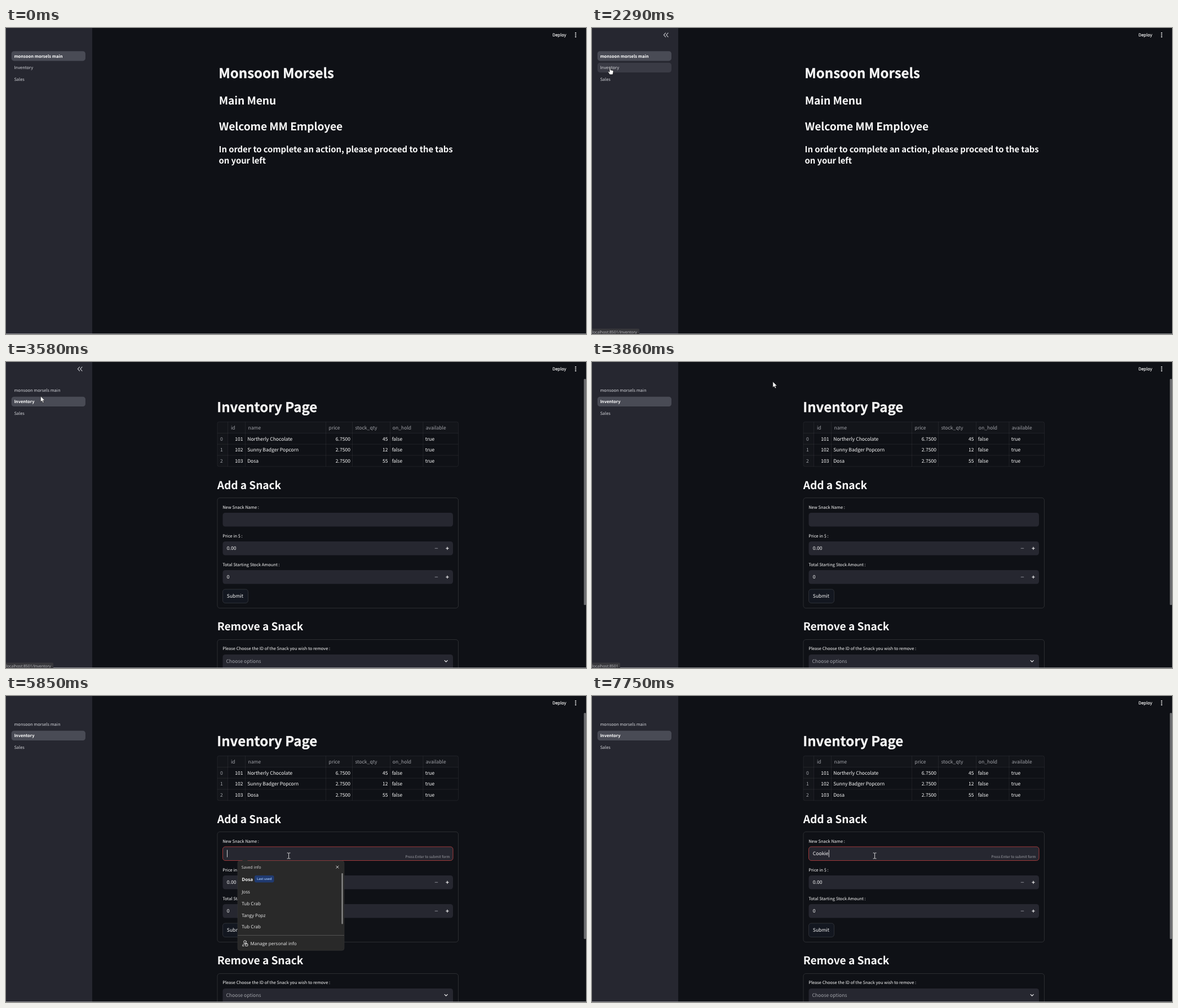
These frames come from a looping animation (1029 px wide and 544 px high, 8000 ms). An HTML page:

```html
<!DOCTYPE html>
<html lang="en">
<head>
<meta charset="utf-8">
<title>Inventory app</title>
<style>
html, body { margin: 0; width: 100%; height: 100%; overflow: hidden; background: #0f1116; }
svg { display: block; width: 1029px; height: 544px; }
text {
  font-family: "Noto Sans CJK JP", "Noto Sans CJK SC", "Noto Sans", sans-serif;
  font-size: 8.57px; fill: #fafafa; white-space: pre; text-rendering: geometricPrecision;
}
.h1 { font-size: 24px; font-weight: 700; stroke: #fafafa; stroke-width: .3; }
.h2 { font-size: 19.2px; font-weight: 600; letter-spacing: -.005em; }
.h3 { font-size: 14.9px; font-weight: 600; letter-spacing: -.006em; }
.small { font-size: 7.5px; }
.bar { stroke: #fafafa; stroke-width: .15; }
.tiny { font-size: 6.4px; }
.dim { fill: #a0a2a8; }
.link { font-size: 7.5px; fill: #d3d4d9; }
.link.on { font-weight: 700; fill: #fff; }
.end { text-anchor: end; }
.field { fill: #262730; }
.frame { fill: none; stroke: #fafafa; stroke-opacity: .17; stroke-width: .7; }
.grid { fill: none; stroke: #fafafa; stroke-opacity: .09; stroke-width: .7; }
.line { fill: none; stroke-linecap: round; stroke-linejoin: round; }
.menu text, .bubble text { font-family: "Open Sans", "Noto Sans", sans-serif; }
.menu text { font-size: 8.1px; fill: #f0f0f0; }
.bubble text { font-size: 6.9px; fill: #bcbcc0; }
#cursor path { stroke-linejoin: round; }
</style>
</head>
<body>
<svg viewBox="0 0 1029 544">
  <rect width="1029" height="544" fill="#0f1116"/>

  <!-- main page -->
  <g data-show="0 2840">
    <text class="h1" x="377.3" y="89">Monsoon Morsels</text>
    <text class="h2" x="377.8" y="136">Main Menu</text>
    <text class="h2" x="377.8" y="182">Welcome MM Employee</text>
    <text class="h3" x="377.6" y="220.8">In order to complete an action, please proceed to the tabs</text>
    <text class="h3" x="377.6" y="241">on your left</text>
  </g>

  <!-- inventory page -->
  <g id="page" data-show="2840 8000">
    <text class="h1" x="377.3" y="89">Inventory Page</text>
    <g data-show="3040 8000">
      <g id="table"></g>
      <text class="h2" x="377.8" y="225.5">Add a Snack</text>
    </g>
    <g data-show="3240 3380">
      <rect class="frame" x="378" y="241.5" width="427.5" height="82" rx="4.5"/>
      <rect x="387.5" y="251" width="408.5" height="26.5" rx="4.5" fill="#1d1e23"/>
      <rect x="387.5" y="287.5" width="408.5" height="26.5" rx="4.5" fill="#1d1e23"/>
    </g>
    <g data-show="3380 8000">
      <rect class="frame" x="378" y="241.5" width="427.5" height="196" rx="4.5"/>
      <text class="small" x="387.2" y="260.8">New Snack Name :</text>
      <rect class="field" x="387.5" y="268" width="408.5" height="24.5" rx="4.5"/>
      <text class="small" x="387.2" y="311.8">Price in $ :</text>
      <rect class="field" x="387.5" y="319" width="408.5" height="24.5" rx="4.5"/>
      <text x="394.8" y="334.3">0.00</text>
      <text class="small" x="387.2" y="362.8">Total Starting Stock Amount :</text>
      <rect class="field" x="387.5" y="370" width="408.5" height="24.5" rx="4.5"/>
      <text x="394.8" y="385.4">0</text>
      <g class="line" stroke-width="1.1">
        <path d="M764.2 331.2h4.6M764.2 382.2h4.6" stroke="#8b8c93"/>
        <path d="M783.8 331.2h4.4m-2.2-2.2v4.4M783.8 382.2h4.4m-2.2-2.2v4.4" stroke="#fafafa"/>
      </g>
      <rect x="387.5" y="404" width="45" height="24.5" rx="4.5" fill="#131720"/>
      <rect class="frame" x="387.5" y="404" width="45" height="24.5" rx="4.5"/>
      <text x="394.8" y="419.4">Submit</text>
      <text class="h2" x="377.8" y="477.4">Remove a Snack</text>
      <rect class="frame" x="378" y="493.5" width="427.5" height="90" rx="4.5"/>
      <text class="small" x="387.2" y="512.4">Please Choose the ID of the Snack you wish to remove :</text>
      <rect class="field" x="387.5" y="520" width="408.5" height="40" rx="4.5"/>
      <text class="dim" x="393.4" y="535.3">Choose options</text>
      <path class="line" d="M781.2 530.7l2.5 2.5 2.5-2.5" stroke="#fafafa" stroke-width="1.2"/>
    </g>
  </g>

  <!-- focused input -->
  <g data-show="5790 8000">
    <rect x="384.5" y="268" width="408.5" height="24.5" rx="4.5" fill="none" stroke="#c0403f" stroke-width=".8"/>
    <text class="tiny end dim" x="787.5" y="287.6">Press Enter to submit form</text>
    <text id="typed" x="391.8" y="283.3"></text>
    <rect id="caret" y="273.6" width=".8" height="13" fill="#fafafa"/>
  </g>

  <!-- autofill menu -->
  <g class="menu" data-show="5850 7010">
    <path d="M418 293.5l6-4 6 4" fill="#292929"/>
    <rect x="411" y="293" width="189" height="159.3" rx="4" fill="#292929" stroke="#3a3a3a" stroke-width=".5"/>
    <text x="417.8" y="307.4" style="font-size:7.2px;fill:#dcdcdc">Saved info</text>
    <path class="line" d="M585.8 302l4.2 4.2m0-4.2l-4.2 4.2" stroke="#e4e4e4" stroke-width=".9"/>
    <text x="418.2" y="329.2" font-weight="700">Dosa</text>
    <rect x="441" y="319" width="34.5" height="12.6" rx="3" fill="#203a70"/>
    <text x="445" y="327.4" style="font-size:5.8px;fill:#a4c8f8" font-weight="600">Last used</text>
    <text x="418.2" y="351.2">Joss</text>
    <text x="418.2" y="371.9">Tub Crab</text>
    <text x="418.2" y="392.6">Tangy Popz</text>
    <text x="418.2" y="413.3">Tub Crab</text>
    <rect x="595.4" y="315" width="2.3" height="90.5" rx="1.1" fill="#8c8c8c"/>
    <path d="M411 425.5h189" stroke="#5c5c5c" stroke-width=".8"/>
    <g class="line" stroke="#ececec" stroke-width=".9">
      <circle cx="424" cy="437" r="2.3"/>
      <path d="M420 444.3c-.4-3 1-3.6 4-3.6M422 444.3h-2"/>
      <rect x="424.4" y="440.8" width="4.6" height="3.6" rx=".6"/>
      <path d="M425.6 440.8v-1h2.2v1"/>
    </g>
    <text x="433.4" y="442.8">Manage personal info</text>
  </g>

  <!-- sidebar -->
  <rect width="153" height="544" fill="#262730"/>
  <g id="nav"></g>
  <path id="fold" class="line" d="M130.6 8.8l-3.3 3.5 3.3 3.5M135 8.8l-3.3 3.5 3.3 3.5" stroke="#c6c7cc" stroke-width="1.1"/>

  <!-- toolbar -->
  <g data-show="2560 3580">
    <path fill="#a3a4a7" transform="translate(911.8 4.2) scale(.63)" d="M13.5 5.5a2 2 0 1 0 0-4 2 2 0 0 0 0 4zM9.9 19.4l1-4.4 2.1 2v6h2v-7.5l-2.1-2 .6-3c1.3 1.5 3.3 2.5 5.5 2.5v-2c-1.9 0-3.5-1-4.3-2.4l-1-1.6c-.4-.6-1-1-1.7-1-.3 0-.5.1-.8.1L6 8.3v4.7h2V9.6l1.8-.7-1.6 8.1-4.9-1-.4 2z"/>
    <text class="small bar" x="937.6" y="15">Stop</text>
  </g>
  <text class="small bar" x="969.5" y="15">Deploy</text>
  <g fill="#fafafa">
    <circle cx="1010.6" cy="8.9" r="1.1"/><circle cx="1010.6" cy="12.3" r="1.1"/><circle cx="1010.6" cy="15.7" r="1.1"/>
  </g>
  <rect data-show="3580 8000" x="1025.2" y="30" width="3.8" height="402" rx="1.5" fill="#6c6d70"/>

  <rect y="543.2" width="1029" height=".8" fill="#a8a9ac"/>
  <g id="bubble" class="bubble">
    <path id="bubbleBox" fill="#37373b"/>
    <text id="url" x=".2" y="543"></text>
  </g>

  <g id="cursor">
    <path data-kind="arrow" d="M0 0v10.2l2.4-2.2 1.7 3.7 1.7-.8-1.7-3.5h3.3z" fill="#fff" stroke="#111" stroke-width=".6"/>
    <path data-kind="hand" d="M-.9 1q.9-1.5 1.8 0v3.7l4 .9q1.2.4 1 1.7l-.6 3.3-.7 2.2h-5l-3-4.3q-.3-1.3 1-1.2l1.5 1.3z" fill="#fff" stroke="#111" stroke-width=".6"/>
    <path data-kind="beam" class="line" d="M-2.5-5h1.8l.7.6.7-.6h1.8M0-4.4v8.8M-2.5 5h1.8l.7-.6.7.6h1.8" stroke="#e6e6e6" stroke-width=".9"/>
  </g>
</svg>

<script>
const LOOP = 8000;
const $ = id => document.getElementById(id);
const start = performance.now();

function add(parent, tag, attrs, content = "") {
  const el = document.createElementNS("http://www.w3.org/2000/svg", tag);
  for (const key in attrs) el.setAttribute(key, attrs[key]);
  el.textContent = content;
  parent.append(el);
  return el;
}

// Table: [label, header x, cell x, right aligned]
const columns = [
  ["", 383, 383], ["id", 402, 423.6, true], ["name", 432.5, 431.2],
  ["price", 575.6, 614, true], ["stock_qty", 622.4, 680.6, true],
  ["on_hold", 688.8, 687.7], ["available", 747.8, 746.8]
];
const rows = [
  [0, 101, "Northerly Chocolate", "6.7500", 45, "false", "true"],
  [1, 102, "Sunny Badger Popcorn", "2.7500", 12, "false", "true"],
  [2, 103, "Dosa", "2.7500", 55, "false", "true"]
];
const table = $("table");
add(table, "path", { fill: "#13151a", d: "M378 106.5h427.5v20H396.5v59.3H378z" });
add(table, "rect", { class: "grid", x: 378, y: 106.5, width: 427.5, height: 79.3, rx: 3 });
add(table, "path", {
  class: "grid",
  d: [396.5, 427.5, 570.5, 617.5, 684.5, 743].map(x => `M${x} 106.5v79.3`).join("") +
     [126.5, 146.2, 166].map(y => `M378 ${y}h427.5`).join("")
});
columns.forEach(([label, headX, x, right], c) => {
  add(table, "text", { class: "dim", x: headX, y: 119.6 }, label);
  rows.forEach((row, r) => add(table, "text", {
    class: (right ? "end" : "") + (c ? "" : " dim"), x, y: 139.5 + r * 19.75
  }, row[c]));
});

const links = ["monsoon morsels main", "Inventory", "Sales"].map((label, i) => {
  const top = 41.2 + i * 20.6;
  return {
    top,
    box: add($("nav"), "rect", { x: 9.7, y: top, width: 131.2, height: 17.2, rx: 4.5 }),
    text: add($("nav"), "text", { x: 14.4, y: top + 11.4 }, label)
  };
});

const timed = [...document.querySelectorAll("[data-show]")].map(el => ({
  el, span: el.dataset.show.split(" ").map(Number)
}));
const pointers = [...document.querySelectorAll("[data-kind]")];

// Pointer path: [time, x, y]
const path = [
  [320, 653, 441], [500, 480, 330], [780, 180, 165], [920, 80, 108], [1060, 26, 84],
  [1200, 21, 83], [1450, 27, 97], [1700, 36, 82], [1890, 35, 70], [2290, 32, 70],
  [3510, 32, 70], [3650, 90, 52], [3860, 320, 35], [4060, 500, 46], [4350, 742, 104],
  [4420, 752, 111], [4800, 620, 215], [5000, 505, 300], [5180, 545, 309],
  [5250, 549, 307], [5590, 501.6, 284]
];
const keys = [[6940, "C"], [7080, "Co"], [7220, "Coo"], [7410, "Cook"], [7610, "Cooki"], [7750, "Cookie"]];

function pointAt(t) {
  const i = path.findIndex(p => p[0] > t);
  if (i < 0) return path.at(-1).slice(1);
  const [t0, x0, y0] = path[Math.max(i - 1, 0)], [t1, x1, y1] = path[i];
  const k = t1 > t0 ? (t - t0) / (t1 - t0) : 0;
  return [x0 + (x1 - x0) * k, y0 + (y1 - y0) * k];
}

const show = (el, on) => el.setAttribute("visibility", on ? "inherit" : "hidden");
const ramp = (t, from, to) => Math.min(1, Math.max(0, (t - from) / (to - from)));

function draw(t) {
  for (const { el, span } of timed) show(el, t >= span[0] && t < span[1]);
  $("page").setAttribute("transform", `translate(${t < 3380 ? 0 : -3})`);

  const [x, y] = pointAt(t);
  const visible = t >= 320;
  const inSidebar = visible && x < 153;
  const active = t < 2490 ? 0 : 1;
  let overLink = false;
  links.forEach(({ top, box, text }, i) => {
    const hover = inSidebar && x > 9 && x < 141 && y >= top && y < top + 17.2;
    overLink ||= hover;
    const color = hover ? "#3a3b45" : i === active ? "#494b55" : "none";
    box.setAttribute("fill", color);
    text.setAttribute("class", i === active ? "link on" : "link");
  });
  show($("fold"), inSidebar);

  const inField = t >= 4420 && y > 268 && y < 292.5;
  const kind = overLink ? "hand" : inField ? "beam" : "arrow";
  for (const p of pointers) show(p, visible && p.dataset.kind === kind);
  $("cursor").setAttribute("transform", `translate(${x} ${y})`);

  const leaving = t >= 3650;
  $("url").textContent = leaving ? "localhost:8501" : "localhost:8501/Inventory";
  $("bubbleBox").setAttribute("d", `M0 534.5H${leaving ? 48 : 82}q2 0 2 2V544H0z`);
  $("bubble").setAttribute("opacity", ramp(t, 1960, 2200) * (1 - ramp(t, 3930, 4200)));

  const typed = $("typed");
  typed.textContent = keys.reduce((s, [at, word]) => t >= at ? word : s, "");
  const width = typed.textContent ? typed.getComputedTextLength() : 0;
  $("caret").setAttribute("x", 392.2 + width);
  show($("caret"), t >= 5790 && !(t >= 6330 && t < 6800));
}

function tick() {
  draw((performance.now() - start) % LOOP);
  requestAnimationFrame(tick);
}
draw(0);
requestAnimationFrame(tick);
</script>
</body>
</html>
```
